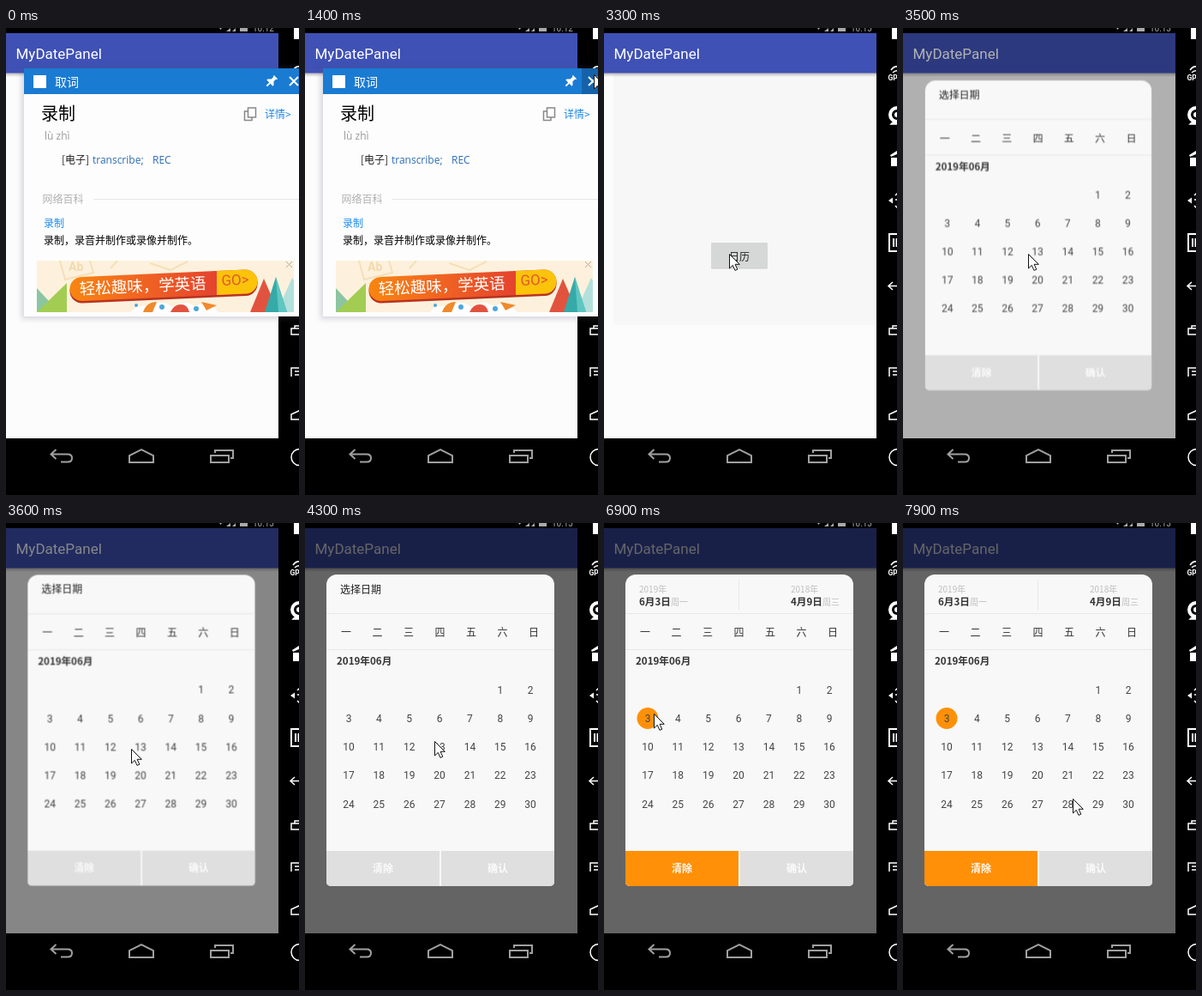
An HTML page that plays this animation: 342x544 px, repeating every 8 s.

```html
<!DOCTYPE html>
<html lang="zh-CN">
<head>
<meta charset="utf-8">
<title>Date picker demo</title>
<style>
html, body { margin: 0; width: 100%; height: 100%; overflow: hidden; background: #000; }
svg { display: block; width: 342px; height: 544px; }
text { font: 12px Roboto, "Noto Sans CJK SC", "Noto Sans CJK", sans-serif; white-space: pre; }
.cjk { font-family: "Noto Sans CJK SC", "Noto Sans CJK", sans-serif; }
.latin { font-family: "Open Sans", "Noto Sans", "Noto Sans CJK SC", sans-serif; }
.mid { text-anchor: middle; }
.bold { font-weight: 700; }
.med { font-weight: 500; }
.thin { font-weight: 350; }
.date { font-size: 11.6px; }
.tiny { font-size: 10px; fill: #bdbdbd; }
.line { fill: none; stroke-width: 1.5; }

.anim { animation: 8s step-end infinite; }
#hover { animation-name: hover; }
#popup { animation-name: popup; transform-origin: 181px 191px; }
#ghost { animation-name: ghost; }
#press { animation-name: press; }
#clockA { animation-name: clockA; }
#clockB { animation-name: clockB; }
#dim { animation-name: dim; }
#dialog { animation-name: dialog; transform-origin: 158px 242px; }
.before { animation-name: before; }
.after { animation-name: after; }
#cursor { animation-name: cursor; }

@keyframes hover { 0% { opacity: 0 } 17.5%, 100% { opacity: 1 } }
@keyframes popup {
  0% { opacity: 1; transform: none }
  20% { opacity: .4; transform: scale(.97) }
  21.25%, 100% { opacity: 0; transform: scale(.97) }
}
@keyframes ghost { 0% { opacity: 0 } 20% { opacity: 1 } 43.75%, 100% { opacity: 0 } }
@keyframes press { 0% { opacity: 0 } 37.5% { opacity: 1 } 41.25%, 100% { opacity: 0 } }
@keyframes clockA { 0% { opacity: 1 } 37.5%, 100% { opacity: 0 } }
@keyframes clockB { 0% { opacity: 0 } 37.5%, 100% { opacity: 1 } }
@keyframes dim { 0% { opacity: 0 } 43.75% { opacity: .3 } 45% { opacity: .47 } 46.25%, 100% { opacity: .6 } }
@keyframes dialog {
  0% { opacity: 0; transform: none }
  43.75% { opacity: 1; transform: scale(.994) }
  45% { opacity: 1; transform: scale(.998) }
  46.25%, 100% { opacity: 1; transform: none }
}
@keyframes before { 0% { opacity: 1 } 80%, 100% { opacity: 0 } }
@keyframes after { 0% { opacity: 0 } 80%, 100% { opacity: 1 } }
@keyframes cursor {
  0% { transform: translate(360px, 40px) }
  12.5% { transform: translate(340px, 46px) }
  13.75% { transform: translate(333px, 48px) }
  15% { transform: translate(331px, 51px) }
  17.5% { transform: translate(337px, 54px) }
  25% { transform: translate(290px, 150px) }
  26.25% { transform: translate(182px, 288px) }
  27.5% { transform: translate(154px, 265px) }
  28.75% { transform: translate(151px, 263px) }
  30% { transform: translate(149px, 262px) }
  31.25% { transform: translate(147px, 262px) }
  33.75% { transform: translate(146px, 263px) }
  53.75% { transform: translate(151px, 254px) }
  55% { transform: translate(162px, 232px) }
  56.25% { transform: translate(169px, 205px) }
  57.5% { transform: translate(163px, 179px) }
  58.75% { transform: translate(144px, 160px) }
  60% { transform: translate(118px, 152px) }
  61.25% { transform: translate(94px, 151px) }
  62.5% { transform: translate(74px, 152px) }
  63.75% { transform: translate(63px, 154px) }
  65% { transform: translate(60px, 170px) }
  66.25% { transform: translate(55px, 198px) }
  67.5% { transform: translate(51px, 220px) }
  68.75% { transform: translate(50px, 229px) }
  71.25% { transform: translate(50px, 228px) }
  72.5% { transform: translate(50px, 227px) }
  86.25% { transform: translate(58px, 222px) }
  87.5% { transform: translate(82px, 222px) }
  88.75% { transform: translate(118px, 232px) }
  90% { transform: translate(160px, 250px) }
  91.25% { transform: translate(197px, 274px) }
  92.5% { transform: translate(219px, 297px) }
  93.75% { transform: translate(223px, 312px) }
  95% { transform: translate(211px, 318px) }
  96.25% { transform: translate(199px, 320px) }
  97.5% { transform: translate(198px, 320px) }
  98.75%, 100% { transform: translate(198px, 321px) }
}
</style>
</head>
<body>
<svg viewBox="0 0 342 544" width="342" height="544">
  <defs>
    <linearGradient id="barShade" x2="0" y2="1">
      <stop offset="0" stop-opacity=".28"/><stop offset="1" stop-opacity="0"/>
    </linearGradient>
    <linearGradient id="pill" gradientUnits="userSpaceOnUse" x1="74" y1="0" x2="246" y2="0">
      <stop offset="0" stop-color="#f8860f"/><stop offset=".4" stop-color="#f26a20"/><stop offset="1" stop-color="#e4432e"/>
    </linearGradient>
    <filter id="soft" x="-10%" y="-10%" width="120%" height="120%"><feGaussianBlur stdDeviation="3"/></filter>
    <clipPath id="screen"><rect width="318" height="478"/></clipPath>
    <clipPath id="ad"><rect x="36" y="271" width="300" height="60"/></clipPath>
    <clipPath id="goPart"><rect x="246" y="270" width="60" height="62"/></clipPath>
    <clipPath id="card"><path d="M25 72a12 12 0 0 1 12-12h242a12 12 0 0 1 12 12v346a5 5 0 0 1-5 5h-256a5 5 0 0 1-5-5z"/></clipPath>
  </defs>
  <rect width="342" height="544"/>

  <!-- phone screen -->
  <g clip-path="url(#screen)">
    <rect y="6" width="318" height="472" fill="#fcfcfc"/>
    <rect id="ghost" class="anim" x="11" y="53" width="307" height="293" rx="3" fill="#f7f7f7"/>
    <rect y="52" width="318" height="5" fill="url(#barShade)"/>
    <rect y="6" width="318" height="46.5" fill="#3f51b5"/>
    <text x="11.5" y="36" style="font-size:17px" fill="#fff">MyDatePanel</text>
    <rect x="125" y="250.5" width="66" height="30" rx="1.5" fill="#ccc"/>
    <rect x="125" y="250" width="66" height="29.5" rx="1.5" fill="#d6d7d7"/>
    <rect id="press" class="anim" x="125" y="250" width="66" height="30" rx="1.5" fill="#c2c3c3"/>
    <text x="158" y="270.5" class="cjk mid" fill="#222">日历</text>
    <g fill="#aaa">
      <path d="M249 0h3l-1.5 2zM257 4l5-4v4zM264 4l4-4v4zM273 0h9v4h-9z"/>
      <text id="clockA" class="anim" x="288" y="4" style="font-size:10px">10:12</text>
      <text id="clockB" class="anim" x="288" y="4" style="font-size:10px">10:13</text>
    </g>
    <rect id="dim" class="anim" y="6" width="318" height="472"/>
  </g>

  <!-- navigation bar -->
  <g class="line" stroke="#a0a0a0" style="stroke-width:2">
    <path d="M58.500 491l-6 5.500 6 5.500M52 496.500h20q5 0 5 4.500t-5 4.500h-8"/>
    <path d="M144 506v-8l14-7 14 7v8z"/>
    <path d="M239 498h21v8h-21zM244 495v-3h21v9h-3"/>
  </g>

  <!-- emulator side bar -->
  <g class="line" stroke="#fff">
    <path d="M336 0h6v13h-6z" fill="#fff" stroke="none"/>
    <path d="M335 49q5-7 12-2M337 52q4-4 8-1"/>
    <text x="331.500" y="61" class="bold" style="font-size:8.500px" fill="#fff" stroke="none">GPS</text>
    <circle cx="342" cy="101" r="8" stroke-width="4"/>
    <circle cx="342" cy="101" r="3" fill="#fff" stroke="none"/>
    <path d="M335 112h8v-2h-6z" fill="#fff"/>
    <path d="M335 151h8v10h-8zM334 148l8-5v4l-7 3z" fill="#fff" stroke="none"/>
    <path d="M332 201l5-3.500v7z" fill="#fff" stroke="none"/>
    <path d="M340 195l3-3M340 207l3 3M340 200h3"/>
    <path d="M344 240h-11v20h11M338 245v10M341.500 245v10" stroke-width="2"/>
    <path d="M337 296l-5 4.500 5 4.500M332 300.500h12"/>
    <path d="M344 350h-11v7h11M337 350v-3h8"/>
    <path d="M344 396h-11v10M337 400h6M337 404h6"/>
    <path d="M344 456h-11v-6l11-5"/>
    <circle cx="342.500" cy="500" r="9.500"/>
  </g>

  <!-- dictionary popup -->
  <g id="popup" class="anim">
    <rect x="18" y="46" width="330" height="293" filter="url(#soft)" fill="#557" opacity=".22"/>
    <rect x="21" y="47" width="321" height="289" fill="#fdfdfd"/>
    <rect x="21" y="47" width="321" height="30" fill="#1a7bd3"/>
    <rect id="hover" class="anim" x="323" y="47" width="19" height="30" fill="#1562ab"/>
    <rect x="32" y="55" width="15" height="15" fill="#fff"/>
    <text x="57" y="67.500" class="cjk thin" style="font-size:14px" fill="#fff">取词</text>
    <g transform="translate(310 62) rotate(45)" fill="#fff">
      <path d="M-3-7h6v1.500h-1v4l3 3v1.500h-4v5h-2v-5h-4v-1.500l3-3v-4h-1z"/>
    </g>
    <path d="M331 57l10 10M341 57l-10 10" stroke="#fff" stroke-width="2"/>

    <text x="41" y="106.500" class="cjk thin" style="font-size:20px">录制</text>
    <path class="line" d="M282.500 93h9v11h-9zM282 97h-3.500v10.500h8.500v-3" stroke="#888"/>
    <text x="302" y="105" class="cjk thin" fill="#1d87e4">详情&gt;</text>
    <text x="45" y="129.500" class="latin" fill="#999">lù zhì</text>
    <text x="65" y="158" class="cjk thin" fill="#222">[电子]</text>
    <text x="101" y="158" class="latin" fill="#2b6cb4">transcribe;</text>
    <text x="171" y="158" class="latin" fill="#2b6cb4">REC</text>
    <text x="42.500" y="203.500" class="cjk thin" fill="#b0b0b0">网络百科</text>
    <path d="M102 199.500h240" stroke="#e6e6e6"/>
    <text x="44" y="231.500" class="cjk thin" fill="#1a8cf0">录制</text>
    <text x="44" y="251.500" class="cjk thin">录制，录音并制作或录像并制作。</text>

    <g clip-path="url(#ad)">
      <rect x="36" y="271" width="300" height="60" fill="#fdf1dd"/>
      <g fill="none" stroke="#f6dfb8" stroke-width="2">
        <path d="M63 271l6 22 33-8-4-14M168 274l24 8 20-10M130 271l-8 9"/>
      </g>
      <text x="73" y="283" class="bold" style="font-size:14px" fill="#f3d9ac">Ab</text>
      <path d="M36 303l26 28h-26z" fill="#8cc5a2"/>
      <path d="M71 297v34h-35z" fill="#a2cd52"/>
      <path d="M146 331q8-10 20-6 16-10 28 0 14-9 26-1 16-7 28 7z" fill="#fff"/>
      <path d="M160 331q4-12 16-12l-5 12zM228 319l18 4-12 6z" fill="#f08a2c"/>
      <path d="M192 331q4-9 12-9t10 9z" fill="#e2533f"/>
      <g fill="#4ea7d8">
        <circle cx="182" cy="325" r="3"/><circle cx="222" cy="327" r="3"/><circle cx="152" cy="323" r="2"/>
      </g>
      <path d="M334 291l2 3v37h-20z" fill="#b4e0dc"/>
      <path d="M301 292l17 39h-33z" fill="#e2533f"/>
      <path d="M315 290l13 41h-26z" fill="#36aaa8"/>
      <path d="M315 290l13 41h-10z" fill="#5fc6c2"/>
      <g stroke-width="28" stroke-linecap="round">
        <path d="M88.500 306.500l191-8.500" stroke="#b9321f"/>
        <path d="M88.500 304l191-8.500" stroke="url(#pill)"/>
        <path d="M88.500 304l191-8.500" stroke="#fcc30b" clip-path="url(#goPart)"/>
      </g>
      <g transform="rotate(-2.600 86 311)">
        <text x="86" y="310.500" class="cjk med" style="font-size:18.500px" fill="#fff">轻松趣味，学英语</text>
        <text x="252" y="307.500" style="font-size:17px" fill="#e4572b">GO&gt;</text>
      </g>
      <path d="M327 272l7 7M334 272l-7 7" stroke="#b5aa9a"/>
    </g>
  </g>

  <!-- date dialog -->
  <g id="dialog" class="anim">
    <g clip-path="url(#card)">
      <rect x="24" y="60" width="268" height="364" fill="#f8f8f8"/>
      <path d="M24 105.500h268M24 147.500h268" stroke="#e9e9e9"/>
      <rect x="24" y="382" width="133" height="42" fill="#dfdfdf"/>
      <rect x="24" y="382" width="133" height="42" fill="#ff9008" class="anim after"/>
      <rect x="159" y="382" width="133" height="42" fill="#dfdfdf"/>
    </g>
    <text x="41" y="81.500" class="cjk med anim before" fill="#222">选择日期</text>
    <g class="anim after">
      <path d="M157.500 66v35" stroke="#e9e9e9"/>
      <g id="range"></g>
      <circle cx="51" cy="227.500" r="12.500" fill="#ff9008"/>
    </g>
    <g id="week" fill="#333"></g>
    <text x="37" y="165" class="cjk bold date" fill="#333">2019年06月</text>
    <g id="days" fill="#444"></g>
    <g fill="#fbfbfb">
      <text x="91" y="407" class="cjk mid bold">清除</text>
      <text x="225" y="407" class="cjk mid bold">确认</text>
    </g>
  </g>

  <g id="cursor" class="anim">
    <path d="M.5.5v16.500l3.800-3.600 2.700 6 2.800-1.200-2.700-5.900h5.200z" fill="#fff" stroke="#111"/>
  </g>
</svg>
<script>
const NS = "http://www.w3.org/2000/svg";

function label(box, str, x, y, cls, fill) {
  const el = document.createElementNS(NS, "text");
  el.setAttribute("x", x);
  el.setAttribute("y", y);
  el.setAttribute("class", cls);
  if (fill) el.setAttribute("fill", fill);
  el.textContent = str;
  document.getElementById(box).append(el);
}

[..."一二三四五六日"].forEach((d, i) => label("week", d, 48 + i * 36.5, 132.3, "cjk mid med"));

// The month starts on a Saturday
for (let d = 1; d <= 30; d++) {
  const cell = d + 4;
  label("days", d, 51 + (cell % 7) * 35.35, 198.5 + Math.floor(cell / 7) * 33.3, "mid");
}

[[41, "2019年", "6月3日", "周一"], [218, "2018年", "4月9日", "周三"]].forEach(([x, year, date, day]) => {
  label("range", year, x, 81, "cjk tiny");
  label("range", date, x, 96.3, "cjk bold date", "#333");
  label("range", day, x + 37, 96, "cjk tiny");
});
</script>
</body>
</html>
```
